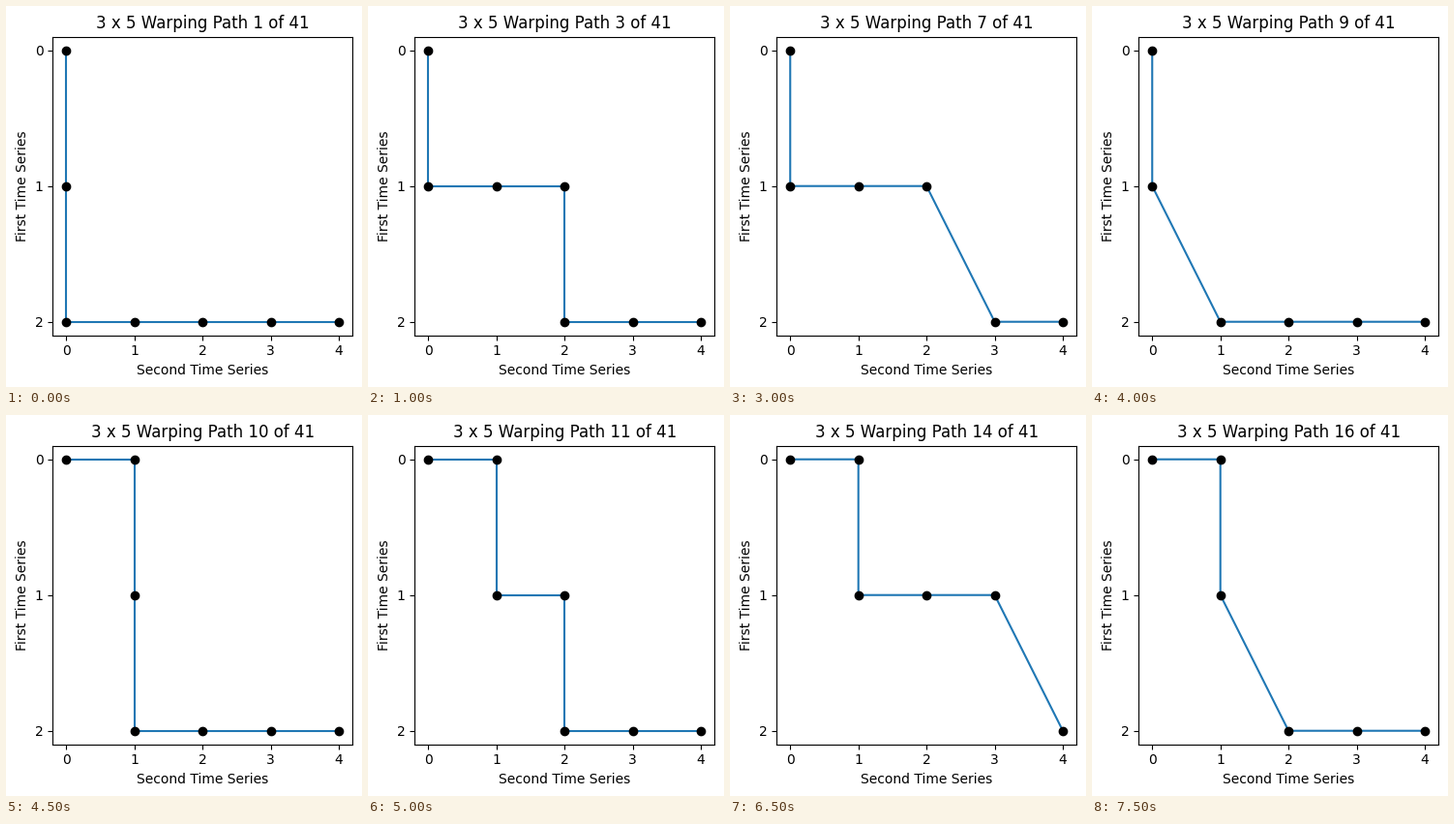
Recreate the animation shown at these times as a matplotlib script. Size 368 px wide and 393 px high, loop 8 s.

```python
import matplotlib.pyplot as plt
from matplotlib.animation import FuncAnimation

W, H, DPI = 368, 393, 100
AX_W, AX_H = 310, 308
ROWS, COLS = 3, 5
SHOWN = 16
STEPS = ((1, 0), (0, 1), (1, 1))  # down, right, diagonal


def warping_paths(row=0, col=0):
    """Yield every monotone path from (row, col) to the last cell."""
    if (row, col) == (ROWS - 1, COLS - 1):
        yield [(row, col)]
        return
    for dr, dc in STEPS:
        r, c = row + dr, col + dc
        if r < ROWS and c < COLS:
            for rest in warping_paths(r, c):
                yield [(row, col)] + rest


paths = list(warping_paths())

fig = plt.figure(figsize=(W / DPI, H / DPI), dpi=DPI, facecolor="white")


def axes_rect(left, bottom):
    return [left / W, bottom / H, AX_W / W, AX_H / H]


ax = fig.add_axes(axes_rect(50, 44))
ax.set_xlabel("Second Time Series")
ax.set_ylabel("First Time Series")
ax.set_xticks(range(COLS))
ax.set_yticks(range(ROWS))
ax.set_xlim(-0.05 * (COLS - 1), 1.05 * (COLS - 1))
ax.set_ylim(1.05 * (ROWS - 1), -0.05 * (ROWS - 1))
line, = ax.plot([], [], color="C0")
dots, = ax.plot([], [], "ko")

# Shift the axes so the labels sit 0.1 inch from the left and bottom edges
box = fig.get_tightbbox().padded(0.1)
ax.set_position(axes_rect(50 - box.x0 * DPI, 44 - box.y0 * DPI))


def draw(i):
    rows, cols = zip(*paths[i])
    line.set_data(cols, rows)
    dots.set_data(cols, rows)
    ax.set_title(f"{ROWS} x {COLS} Warping Path {i + 1} of {len(paths)}")
    return line, dots


anim = FuncAnimation(fig, draw, frames=SHOWN, interval=500,
                     repeat=True, repeat_delay=0)
plt.show()
```
